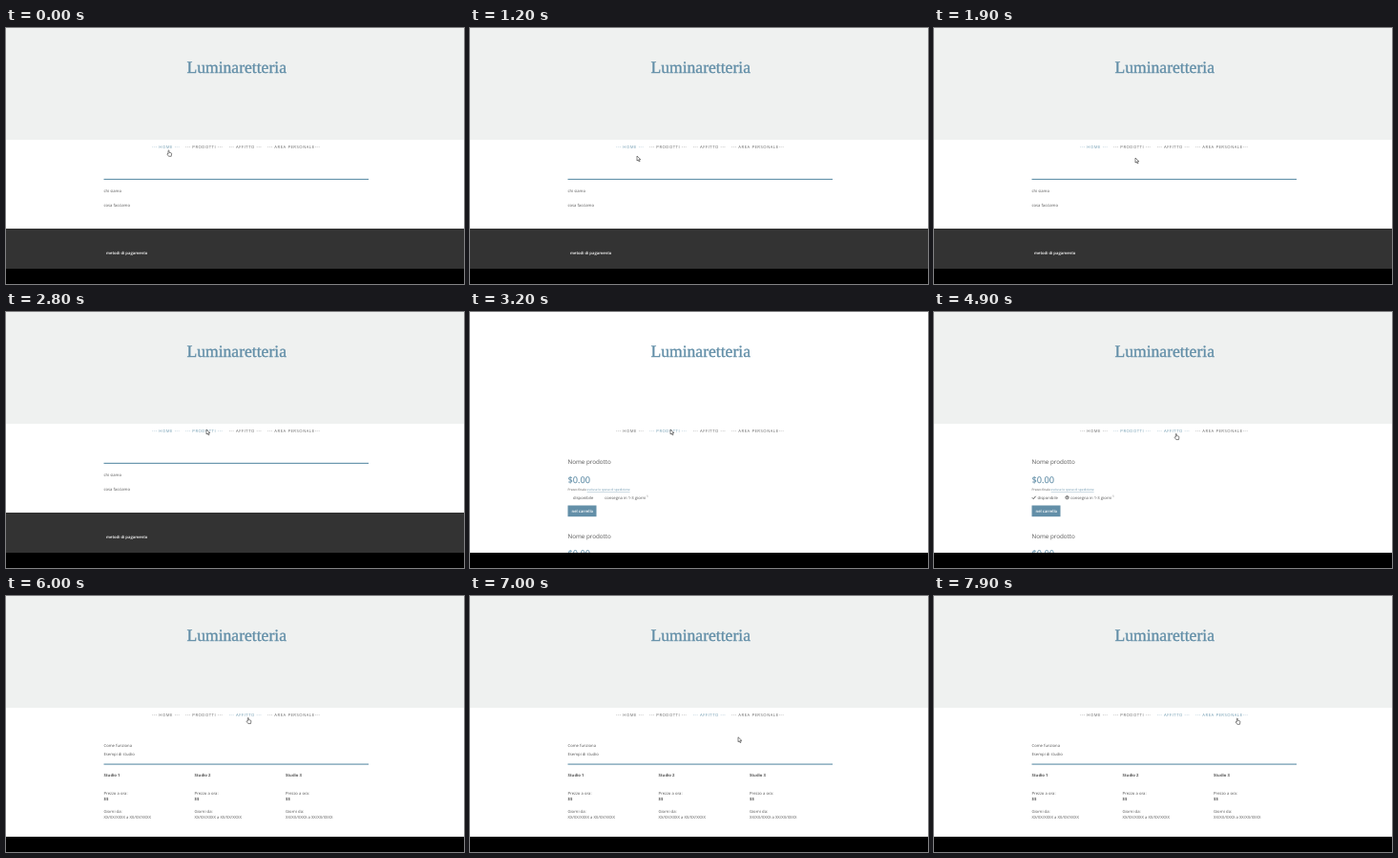
Write an HTML page that moves like this. It is 480 px wide and 268 px high and loops after 8 s.

```html
<!DOCTYPE html>
<html lang="it">
<head>
<meta charset="utf-8">
<title>Navigazione</title>
<style>
  html, body { margin: 0; width: 100%; height: 100%; overflow: hidden; background: #fff; }
  svg { display: block; width: 100%; height: 100%; }
  text { font: 4.2px "Open Sans", sans-serif; fill: #555; white-space: pre; text-rendering: geometricPrecision; }
  .title { font: 17.6px "Liberation Serif", serif; fill: #638fa8; stroke: #638fa8; stroke-width: .35; }
  .nav text { letter-spacing: .55px; fill: #666; }
  .name { font-size: 6.25px; }
  .price { font-size: 9.2px; fill: #638fa8; stroke: #638fa8; stroke-width: .15; }
  .small { font-size: 3.25px; }
  .link { fill: #638fa8; text-decoration: underline; }
  .bold { font-weight: 700; }
  .light { fill: #fff; font-weight: 600; }
  .rule { fill: #6b97ae; }
  .cursor { fill: #fff; stroke: #333; stroke-width: .6; stroke-linejoin: round; }
</style>
</head>
<body>
<svg viewBox="0 0 480 268" preserveAspectRatio="none">
  <rect width="480" height="268" fill="#fff"/>
  <rect id="header" width="480" height="117" fill="#eff1f0"/>
  <text class="title" x="241.7" y="47" text-anchor="middle">Luminaretteria</text>
  <g class="nav" id="nav"></g>

  <g id="home">
    <rect class="rule" x="102.5" y="157.8" width="277.5" height="1.2"/>
    <text x="102.5" y="171.5">chi siamo</text>
    <text x="102.5" y="186.5">cosa facciamo</text>
    <rect y="210" width="480" height="42" fill="#333"/>
    <text class="light" x="105" y="237">metodi di pagamento</text>
  </g>

  <g id="products">
    <text class="name" x="102.5" y="159">Nome prodotto</text>
    <text class="price" x="102.5" y="178.5">$0.00</text>
    <text class="small" x="102.5" y="187">Prezzo finale <tspan class="link">escluse le spese di spedizione</tspan></text>
    <g id="stock">
      <text x="108" y="195.6">disponibile</text>
      <text x="141.2" y="195.6">consegna in 1-3 giorni<tspan class="small" dx=".8" dy="-1.5">1</tspan></text>
    </g>
    <g id="icons" fill="none" stroke="#444">
      <path d="M102.9 194.3l1.3 1.4 2.4-2.9" stroke-width=".9"/>
      <circle cx="139.5" cy="194.2" r="1.6" stroke-width=".8"/>
      <path d="M139.5 193v1.3h1" stroke-width=".5"/>
    </g>
    <rect x="102.5" y="202.5" width="30" height="11.7" fill="#638fa8"/>
    <text class="light" x="106.5" y="209.9">nel carrello</text>
    <text class="name" x="102.5" y="236.5">Nome prodotto</text>
    <text class="price" x="102.5" y="256">$0.00</text>
  </g>

  <g id="rent">
    <text x="102.5" y="157.7">Come funziona</text>
    <text x="102.5" y="166.6">Esempi di studio</text>
    <rect class="rule" x="102.5" y="175.5" width="277.5" height="1.2"/>
  </g>

  <rect y="252" width="480" height="16" fill="#000"/>
  <g id="pointer" class="cursor">
    <path id="arrow" d="M0 0v5l1.2-1 .9 1.9 1-.5-.9-1.8h1.6z"/>
    <path id="hand" d="M-.5.4Q0-.3.5.4V2.3l2 .5q.7.2.6.9L2.7 6.3H0L-1.7 4Q-1.5 3.2-.5 3.8z"/>
  </g>
</svg>
<script>
const LOOP = 8000, STEP = 100;
const GREY = [102, 102, 102], BLUE = [110, 154, 176];
const $ = id => document.getElementById(id);

function addText(parent, x, y, content, className = '') {
  const el = document.createElementNS('http://www.w3.org/2000/svg', 'text');
  el.setAttribute('x', x);
  el.setAttribute('y', y);
  el.setAttribute('class', className);
  el.textContent = content;
  return parent.appendChild(el);
}

// Each item is tinted between its listed times.
const navItems = [
  { x: 153, label: '--- HOME ---', from: 0, to: 3200 },
  { x: 188, label: '--- PRODOTTI ---', from: 2000, to: 6000 },
  { x: 233.7, label: '--- AFFITTO ---', from: 4700, to: LOOP },
  { x: 274, label: '--- AREA PERSONALE---', from: 7500, to: LOOP }
];
for (const item of navItems) item.el = addText($('nav'), item.x, 125.6, item.label);

[102.5, 197.5, 293].forEach((x, i) => {
  const rows = [
    [189, 'Studio ' + (i + 1), 'bold'],
    [207.7, 'Prezzo a ora:'],
    [214, '$$', 'bold'],
    [226.5, 'Giorni da:'],
    [232.8, 'XX/XX/XXXX a XX/XX/XXXX']
  ];
  for (const [y, label, className] of rows) addText($('rent'), x, y, label, className);
});

// Pointer path: time, x, y
const path = [
  [1000, 170.5, 128], [1200, 175, 134], [1500, 190, 145], [1700, 203, 143],
  [1900, 211, 136], [2100, 210, 123], [3700, 210, 123], [3900, 215, 131],
  [4200, 235, 147], [4400, 246.8, 146.5], [4600, 252.5, 137], [4900, 253.8, 127.3],
  [6300, 253.8, 127.3], [6500, 257, 134], [6800, 272, 147], [7200, 290, 148.5],
  [7400, 302, 146], [7700, 315, 135], [7900, 317.8, 128]
];
const handTimes = [[0, 1200], [2100, 2800], [4700, 6200], [7700, LOOP]];

function pointerAt(t) {
  const i = path.findIndex(point => point[0] >= t);
  if (i < 0) return path[path.length - 1].slice(1);
  if (i === 0) return path[0].slice(1);
  const [t0, x0, y0] = path[i - 1], [t1, x1, y1] = path[i];
  const k = (t - t0) / (t1 - t0);
  return [x0 + (x1 - x0) * k, y0 + (y1 - y0) * k];
}

const show = (id, visible) => $(id).style.display = visible ? '' : 'none';

function render(t) {
  show('home', t < 3200);
  show('products', t >= 3200 && t < 6000);
  show('rent', t >= 6000);

  const loading = t >= 3200 && t < 3300;
  show('header', !loading);
  show('icons', !loading);
  $('stock').setAttribute('transform', `translate(${loading ? 0 : 2} 0)`);
  $('stock').firstElementChild.setAttribute('x', loading ? 108 : 106.5);

  for (const { el, from, to } of navItems) {
    const tint = t >= to ? 0 : from === 0 ? 1 : Math.min(1, Math.max(0, (t - from + STEP) / 300));
    el.style.fill = `rgb(${GREY.map((c, i) => c + (BLUE[i] - c) * tint)})`;
  }

  const hand = handTimes.some(([from, to]) => t >= from && t < to);
  show('hand', hand);
  show('arrow', !hand);
  $('pointer').setAttribute('transform', `translate(${pointerAt(t)})`);
}

const start = performance.now();
function tick() {
  const t = (performance.now() - start) % LOOP;
  render(Math.floor(t / STEP) * STEP);
  requestAnimationFrame(tick);
}
tick();
</script>
</body>
</html>
```
